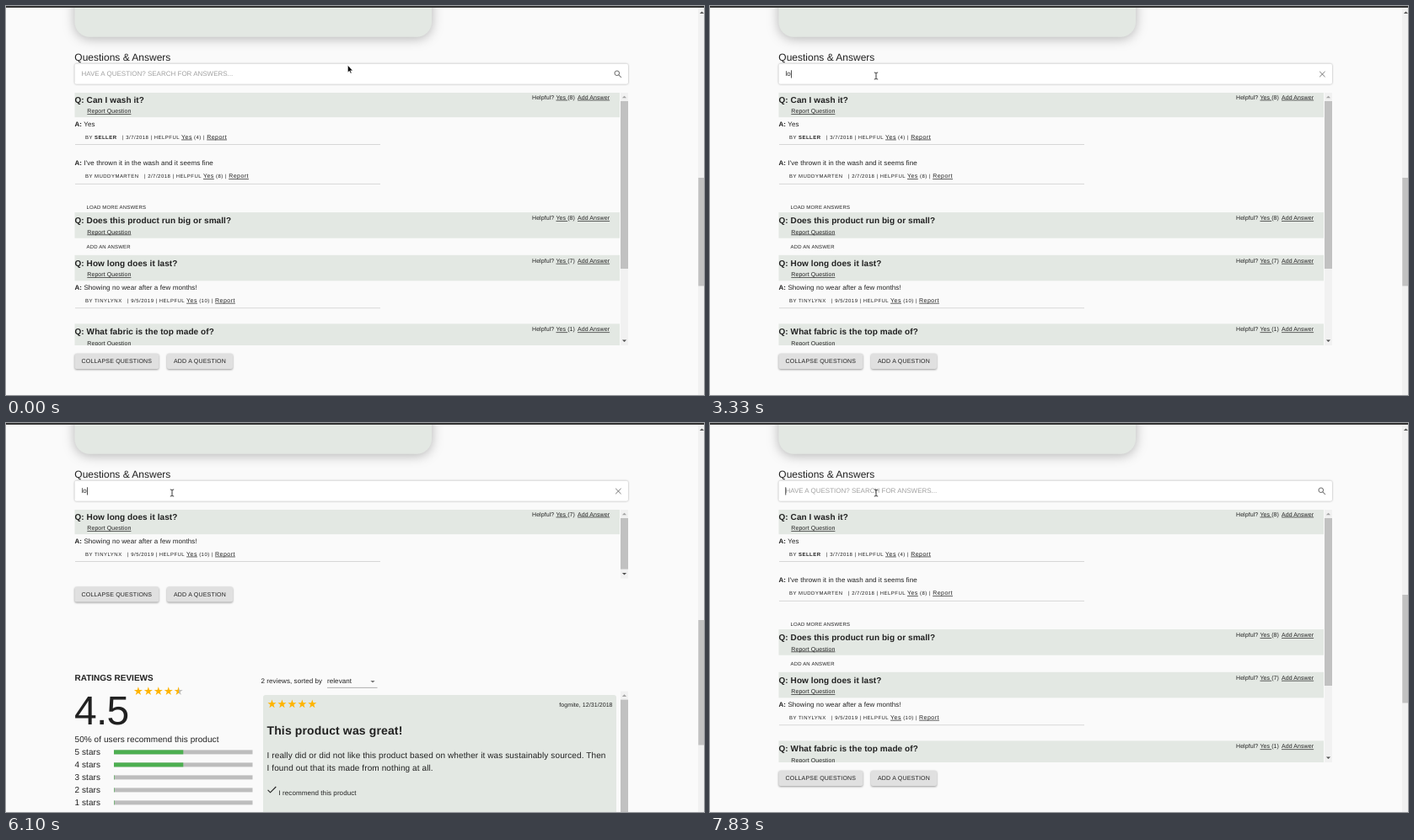
An HTML page that plays this animation: 828x462 px, repeating every 8 s.

```html
<!DOCTYPE html>
<html lang="en">
<head>
<meta charset="utf-8">
<title>Questions &amp; Answers</title>
<style>
  html, body { margin: 0; width: 100%; height: 100%; overflow: hidden; background: #fafafa; }
  svg { display: block; width: 828px; height: 462px; }
  text {
    font-family: "Liberation Sans", Arial, sans-serif;
    fill: #212121;
    text-rendering: geometricPrecision;
    white-space: pre;
  }
  .bold { font-weight: 700; }
  .link { text-decoration: underline; }
  .end { text-anchor: end; }
  .hint { fill: #a2a2a2; }
  .card { filter: drop-shadow(0 2px 7px rgba(0, 0, 0, .28)); }
  .paper { filter: drop-shadow(0 .7px .8px rgba(0, 0, 0, .35)); }
  .button { filter: drop-shadow(0 1px 1px rgba(0, 0, 0, .38)); }
</style>
</head>
<body>
<svg id="stage" viewBox="0 0 828 462"></svg>
<script>
const SAGE = '#e3e8e3', INK = '#212121', GOLD = '#ffb400', GREY = '#bdbdbd';
const LIST_TOP = 103, LIST_MAX = 403, LOOP = 8000;

const rect = (x, y, w, h, fill, extra = '') =>
  `<rect x="${x}" y="${y}" width="${w}" height="${h}" fill="${fill}" ${extra}/>`;
const path = (d, extra) => `<path d="${d}" ${extra}/>`;
// ls is the letter spacing in em
const text = (x, y, size, str, cls = '', ls = 0) =>
  `<text x="${x}" y="${y}" font-size="${size}" class="${cls}" letter-spacing="${ls * size}">${str}</text>`;
const span = (str, cls = '', size = '') =>
  `<tspan class="${cls}" ${size && `font-size="${size}"`}>${str}</tspan>`;
const arrow = (x, y, up, fill, w = 2.6) =>
  path(`M${x - w} ${y + (up ? 1.3 : -1.3)}h${2 * w}l${-w} ${up ? -w : w}z`, `fill="${fill}"`);

function scrollbar(top, bottom, thumbEnd) {
  return rect(729, top, 9, bottom - top, '#f1f1f1') +
    rect(729, top + 10, 9, thumbEnd - top - 10, '#c1c1c1') +
    arrow(733.5, top + 5, true, '#a3a3a3') + arrow(733.5, bottom - 5.3, false, '#505050');
}

function star(cx, cy, fill) {
  let d = '';
  for (let i = 0; i < 10; i++) {
    const r = i % 2 ? 2.1 : 5.3, a = i * Math.PI / 5;
    d += `${i ? 'L' : 'M'}${(cx + r * Math.sin(a)).toFixed(2)} ${(cy - r * Math.cos(a)).toFixed(2)}`;
  }
  return path(d + 'z', `fill="${fill}"`);
}
const stars = (x, y, lastFill = GOLD) =>
  [0, 1, 2, 3, 4].map(i => star(x + i * 11.95, y, i < 4 ? GOLD : lastFill)).join('');

// Questions and answers

const yes = { body: 'Yes', by: 'SELLER', staff: true, date: '3/7/2018', votes: 4 };
const washed = { body: "I've thrown it in the wash and it seems fine", by: 'MUDDYMARTEN', date: '2/7/2018', votes: 8 };
const noWear = { body: 'Showing no wear after a few months!', by: 'TINYLYNX', date: '9/5/2019', votes: 10 };

const wash = ['Can I wash it?', 8], size = ['Does this product run big or small?', 8];
const lasting = ['How long does it last?', 7], fabric = ['What fabric is the top made of?', 1];

function answer(y, { body, by, staff, date, votes }) {
  return text(81.5, y, 8, span('A:', 'bold') + ' ' + body, '', .0094) +
    text(94, y + 15, 6, `BY ${span(by, staff ? 'bold' : '')}   | ${date} | HELPFUL ` +
      `${span('Yes', 'link', 7)} (${votes}) | ${span('Report', 'link', 7)}`, '', .08) +
    rect(82, y + 21.6, 362, .8, '#cfcfcf');
}

function question(y, [title, votes], answers) {
  let out = rect(81.5, y, 646.5, 30.6, SAGE) +
    text(81.5, y + 13, 10, 'Q: ' + title, 'bold', .0075) +
    text(96.3, y + 25.4, 7, 'Report Question', 'link', .0107) +
    text(624, y + 9, 7, 'Helpful?', '', .0107) +
    text(652.5, y + 9, 7, `${span('Yes ', 'link')}(${votes})`, '', .0107) +
    text(678, y + 9, 7, 'Add Answer', 'link', .0107);
  answers.forEach((a, i) => out += answer(y + 41 + i * 46.7, a));
  if (!answers.length) out += text(95.5, y + 42.5, 6, 'ADD AN ANSWER', '', .0286);
  if (answers.length > 1) out += text(95.5, y + 139.3, 6, 'LOAD MORE ANSWERS', '', .0286);
  return out;
}

const rowHeight = answers => [50.7, 81.6, 143.5][answers.length];

// pageThumb: top and bottom of the window's scrollbar handle
function makeView(rows, pageThumb, listThumb) {
  let y = 101.6, body = '';
  for (const [q, answers] of rows) {
    body += question(y, q, answers);
    y += rowHeight(answers);
  }
  const bottom = Math.min(y + 1.4, LIST_MAX);
  return {
    shift: bottom - LIST_MAX,
    html: `<clipPath id="clip${rows.length}${bottom | 0}">${rect(81, LIST_TOP, 657, bottom - LIST_TOP, '#000')}</clipPath>` +
      `<g clip-path="url(#clip${rows.length}${bottom | 0})">${body}</g>` +
      scrollbar(LIST_TOP, bottom, listThumb || bottom - 11) +
      rect(821.3, pageThumb[0], 7, pageThumb[1] - pageThumb[0], '#c1c1c1'),
  };
}

const views = {
  all: makeView([[wash, [yes, washed]], [size, []], [lasting, [noWear]], [fabric, []]], [204, 332.5], 312),
  stale: makeView([[lasting, [yes, washed]]], [224, 367]),
  found: makeView([[lasting, [noWear]]], [234, 382.5]),
  restored: makeView([[wash, [noWear]], [size, []], [lasting, []], [fabric, []]], [212, 346]),
};

// Everything under the list, laid out for the tallest list

function button(x, w, label) {
  return rect(x, 412.8, w, 18.2, '#e0e0e0', 'rx="2" class="button"') +
    text(x + 8, 424.3, 7, label, '', .0286);
}

function ratings() {
  let out = text(81.5, 524, 10, 'RATINGS REVIEWS', 'bold') +
    text(81, 576.3, 48, '4.5', '', -.0156) + stars(156.9, 537, 'url(#half)') +
    text(81.5, 597.6, 10, '50% of users recommend this product', '', .0075);
  for (let i = 0; i < 5; i++) {
    const y = 612.8 + i * 15;
    out += text(81.5, y, 10, `${5 - i} stars`, '', .0075) +
      rect(128, y - 6, 164.5, 5, GREY) + rect(128, y - 6, i < 2 ? 82.3 : .6, 5, '#4caf50');
  }
  return out;
}

function review() {
  return text(302.5, 527.6, 8, '2 reviews, sorted by', '', .0094) +
    text(381, 527.2, 8, 'relevant', '', .0094) +
    rect(381, 532.3, 59.5, .7, '#8f8f8f') + arrow(435, 525.6, false, '#757575') +
    rect(305, 541.5, 419, 200, SAGE, 'rx="3"') + stars(315.5, 552.3) +
    text(719.6, 555.6, 7, 'fogmite, 12/31/2018', 'end', .0107) +
    text(309.5, 588.3, 14, 'This product was great!', 'bold', .0094) +
    text(309.5, 616.6, 10, 'I really did or did not like this product based on whether it was sustainably sourced. Then', '', .0107) +
    text(309.5, 631.6, 10, 'I found out that its made from nothing at all.', '', .0107) +
    path('M310.6 654.3l2.9 2.9 6.8-6.8', `fill="none" stroke="${INK}" stroke-width="1.1"`) +
    text(323.5, 660, 8, 'I recommend this product', '', .0094) +
    scrollbar(537, 840, 760);
}

const stage = document.getElementById('stage');
stage.innerHTML =
  `<defs><linearGradient id="half"><stop offset=".5" stop-color="${GOLD}"/>` +
  `<stop offset=".5" stop-color="${GREY}"/></linearGradient></defs>` +
  rect(0, 0, 828, 462, '#fafafa') +
  rect(81.5, -40, 423.5, 76.8, SAGE, 'rx="18" class="card"') +
  rect(821, 0, 7, 462, '#f1f1f1') + arrow(825.5, 7.8, true, '#505050') +
  rect(0, 0, 828, 2, '#333') +
  text(81.3, 65.2, 12, 'Questions &amp; Answers') +
  rect(81.5, 68.7, 656.5, 24, '#fff', 'rx="2" class="paper"') +
  text(89.4, 83.2, 8, 'HAVE A QUESTION? SEARCH FOR ANSWERS...', 'hint').replace('<text', '<text id="hint"') +
  text(89.4, 83.2, 8, '').replace('<text', '<text id="typed"') +
  `<rect id="caret" y="76.3" width=".8" height="9.2" fill="${INK}"/>` +
  `<g id="search" fill="none" stroke="#757575" stroke-width="1.05">
     <circle cx="-1.2" cy="-1.2" r="2.75"/><path d="M.9 .9L4 4"/></g>` +
  `<g id="clear" stroke="#757575" stroke-width="1"><path d="M-3.2-3.2L3.2 3.2M3.2-3.2L-3.2 3.2"/></g>` +
  Object.entries(views).map(([id, v]) => `<g id="${id}">${v.html}</g>`).join('') +
  `<g id="below">${button(81.5, 99.8, 'COLLAPSE QUESTIONS')}${button(191, 78, 'ADD A QUESTION')}${ratings()}${review()}</g>` +
  path('M0 0v8.3l1.9-1.7 1.4 2.9 1.2-.5-1.4-2.8h2.6z', 'id="pointer" fill="#000" stroke="#fff" stroke-width=".4"') +
  path('M-2.2-4Q0-4 0-3V3Q0 4-2.2 4M2.2-4Q0-4 0-3M0 3Q0 4 2.2 4',
    'id="beam" fill="none" stroke="#222" stroke-width=".9"');

const el = id => document.getElementById(id);
const show = (id, on) => el(id).setAttribute('display', on ? 'inline' : 'none');
const move = (id, x, y, k = 1) => el(id).setAttribute('transform', `translate(${x} ${y}) scale(${k})`);

// Last value whose start time has been reached
const at = (t, track) => track.reduce((value, [start, next]) => t >= start ? next : value, track[0][1]);

const viewTrack = [[0, 'all'], [3600, 'stale'], [4100, 'found'], [6770, 'restored'], [7130, 'all']];
const typedTrack = [[0, ''], [3070, 'l'], [3230, 'lo'], [3600, 'lon'], [4100, 'long'],
  [5830, 'lon'], [6100, 'lo'], [6770, '']];
const caretTrack = [[0, false], [2270, true], [2630, false], [3070, true], [4900, false],
  [5500, true], [7330, false], [7830, true]];
const searchTrack = [[0, 1], [3070, 0], [6770, .6], [6870, 1]];
const clearTrack = [[0, 0], [3070, .6], [3230, 1], [6770, 0]];

// Share of a move made in n equal jumps, the first one at the start time
const jumps = (t, start, end, n) =>
  t < start ? 0 : Math.min(1, (Math.floor((t - start) * (n - 1) / (end - start)) + 1) / n);
const ease = p => p * p * (3 - 2 * p);

function cursor(t) {
  if (t >= 2270) return [197, 83];
  const a = ease(jumps(t, 530, 1000, 9)), b = ease(jumps(t, 1230, 1500, 6));
  return [405.5 - 169 * a - 43 * b, 70.5 + 42.5 * a - 49.5 * b];
}

function draw(t) {
  const view = at(t, viewTrack), typed = at(t, typedTrack);
  for (const id in views) show(id, id === view);
  move('below', 0, views[view].shift);

  el('typed').textContent = typed;
  show('hint', !typed);
  show('caret', at(t, caretTrack));
  el('caret').setAttribute('x', 89.4 + (typed ? el('typed').getComputedTextLength() + .5 : 0));
  move('search', 726, 81, at(t, searchTrack));
  move('clear', 726.4, 81, at(t, clearTrack));

  const [x, y] = cursor(t), overText = y < 94 && (y > 72 || x < 197);
  show('beam', overText);
  show('pointer', !overText);
  move('beam', x, y);
  move('pointer', x, y);
}

let begin;
function tick(now) {
  begin ??= now;
  draw((now - begin) % LOOP);
  requestAnimationFrame(tick);
}
draw(0);
requestAnimationFrame(tick);
</script>
</body>
</html>
```
